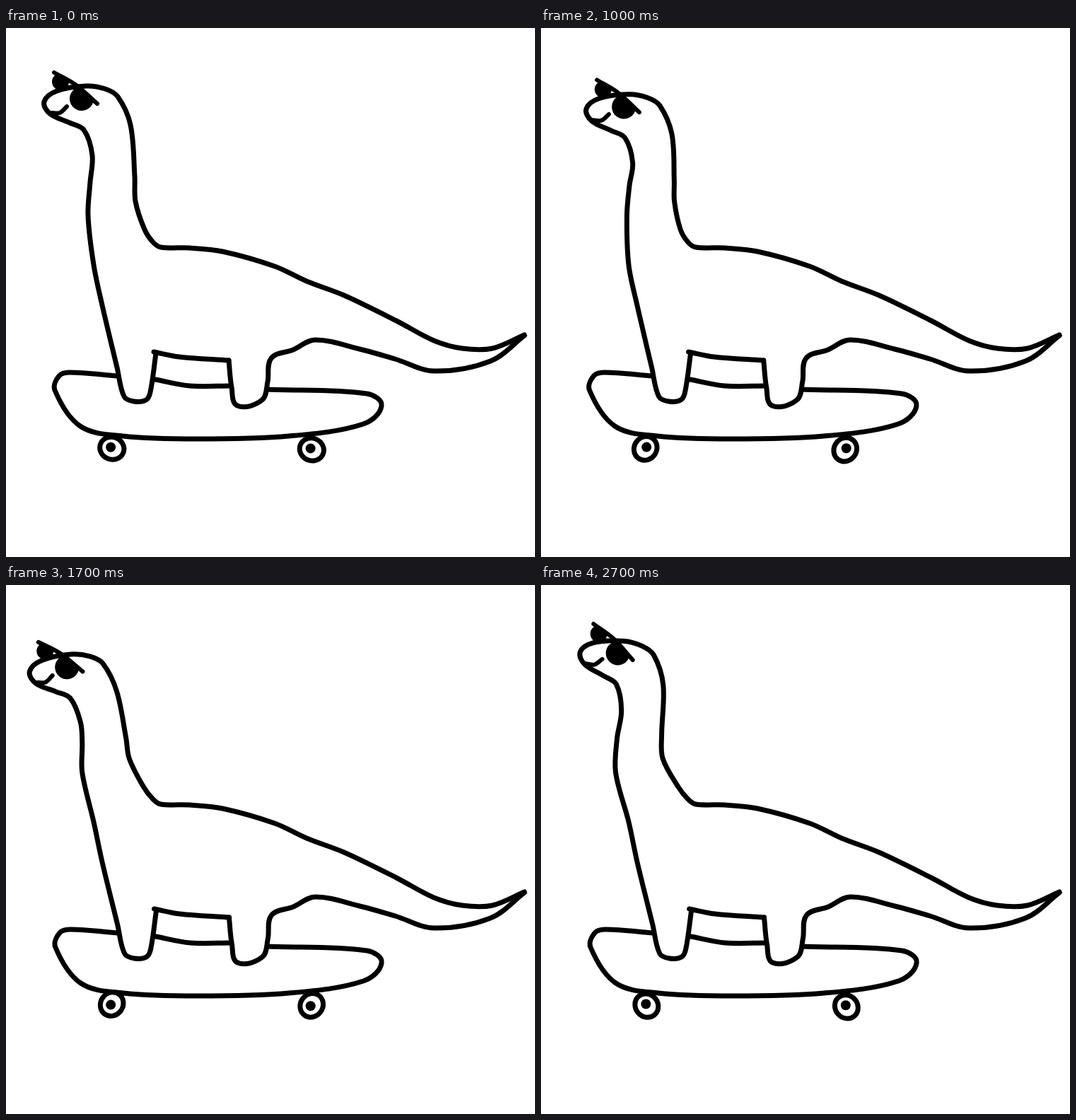
Animation, 748 px wide and 748 px high, one loop 2.8 s. Source, as an HTML page with a canvas:

```html
<!DOCTYPE html>
<html lang="en">
<head>
<meta charset="utf-8">
<title>Skating dinosaur</title>
<style>
  html, body { margin: 0; width: 100%; height: 100%; overflow: hidden; background: #fff; }
  canvas { display: block; width: 748px; height: 748px; }
</style>
</head>
<body>
<canvas id="stage" width="748" height="748"></canvas>
<script>
const ctx = document.getElementById('stage').getContext('2d');
const LOOP = 2800, STEP = 100, PHASE = 8;
const TAU = 2 * Math.PI, DEG = TAU / 360;

// Key points of each stroke in the resting pose, written as "x,y x,y ...".
const pts = text => text.split(' ').map(p => p.split(',').map(Number));
const arcPts = (x, y, r, from, to) => Array.from({ length: 13 }, (_, i) => {
  const a = mix(from, to, i / 12) * DEG;
  return [x + r * Math.cos(a), y + r * Math.sin(a)];
});

const neckFront = pts('212,460 204,515 198,526 181,528 167,521 157,480 136,392 124,335 116,265 119,218 122,180 110,144 90,134 62,121');
const headAndNape = pts('54,104 72,89 113,82 140,86 158,97 176,137 182,210 183,245 196,285 208,303 219,310');
const back = pts('260,311 306,316 380,337 425,358 478,378 552,414 605,442 645,453 688,453 733,434');
const underside = pts('733,435 685,471 605,485 550,468 500,454 437,441 406,455 375,467 370,500 362,526 327,534 319,508 315,470');
const belly = pts('315,470 245,465 209,458');
const board = pts('158,492 90,487 75,492 69,512 105,563 165,577 270,581 400,577 505,560 531,534 510,517 370,511');
const deck = pts('211,497 260,506 318,506');
const smile = pts('64,120 76,120 86,111');
const shades = pts('68,63 98,80 129,107');
const lenses = [arcPts(77, 76, 11, -10, 249), arcPts(107, 100, 16, 6, 256)];
const strokes = [board, deck, [...neckFront, ...headAndNape, ...back], underside, belly];

// The head swings between four poses, each move slowing down more than the last.
const HEAD = { x: 98.5, y: 85 };
const poses = [
  { ...HEAD, tilt: 0, sway: 0 },
  { x: 127, y: 91, tilt: 4.6, sway: 12 },
  { x: 69.5, y: 108, tilt: -5, sway: -8 },
  { x: 102, y: 80.5, tilt: 6.8, sway: -11 }
];
const slowing = [1, 1.3, 2];

function mix(a, b, u) { return a + (b - a) * u; }

function smooth(from, to, v) {
  const u = Math.min(1, Math.max(0, (v - from) / (to - from)));
  return u * u * (3 - 2 * u);
}

function poseAt(step) {
  const i = Math.min(2, Math.floor(step / PHASE));
  const left = Math.max(0, 1 - (step - i * PHASE) / PHASE);
  const u = 1 - left ** slowing[i];
  const between = key => mix(poses[i][key], poses[i + 1][key], u);
  return { x: between('x'), y: between('y'), tilt: between('tilt') * DEG, sway: between('sway') };
}

// Rigid head, bending neck, nearly still body.
function makeWarp(pose) {
  const cos = Math.cos(pose.tilt), sin = Math.sin(pose.tilt);
  return ([x, y]) => {
    const dx = x - HEAD.x, dy = y - HEAD.y;
    const rigid = 1 - smooth(160, 255, y);
    const bend = 1 - smooth(255, 325, y + (x - 118) / 4);
    const settle = 0.1 * smooth(380, 440, y) * Math.max(0, 1 - x / 600);
    return [
      mix(x + pose.sway * (bend - settle), pose.x + dx * cos - dy * sin, rigid),
      mix(y, pose.y + dx * sin + dy * cos, rigid)
    ];
  };
}

// Smooth curve through the points; handles scale with each segment's length.
function trace(points) {
  const at = i => points[Math.min(points.length - 1, Math.max(0, i))];
  const handle = (i, reach) => {
    const [ax, ay] = at(i - 1), [bx, by] = at(i + 1), [x, y] = at(i);
    const k = reach / Math.hypot(bx - ax, by - ay);
    return [x + (bx - ax) * k, y + (by - ay) * k];
  };
  ctx.beginPath();
  ctx.moveTo(...points[0]);
  for (let i = 1; i < points.length; i++) {
    const [a, b] = [at(i - 1), at(i)];
    const reach = Math.hypot(b[0] - a[0], b[1] - a[1]) / 3;
    ctx.bezierCurveTo(...handle(i - 1, reach), ...handle(i, -reach), ...b);
  }
}

// A slightly oval ring and its hub wobble around the axle.
function wheel(x, y, turn) {
  const c = Math.cos(turn), s = -Math.sin(turn);
  ctx.beginPath();
  ctx.ellipse(x + 1.3 * c, y + 1.3 * s, 17.3, 15.8, -turn - 0.2, 0, TAU);
  ctx.stroke();
  ctx.beginPath();
  ctx.arc(x - 0.7 * c, y - 0.4 - 0.7 * s, 7, 0, TAU);
  ctx.fill();
}

function drawSpeedLines() {
  ctx.lineCap = 'butt';
  ctx.lineWidth = 6.5;
  ctx.beginPath();
  for (const row of [-1, 0, 1]) {
    const length = row ? 51 : 38;
    const y = 533 + row * 13;
    ctx.moveTo(554, y);
    ctx.lineTo(554 + length, y + row * 10.5 - (row ? 0 : 2));
  }
  ctx.stroke();
}

function draw(time) {
  const step = Math.floor((time % LOOP) / STEP);
  const warp = makeWarp(poseAt(step));
  const line = points => { trace(points.map(warp)); ctx.stroke(); };

  ctx.fillStyle = '#fff';
  ctx.fillRect(0, 0, 748, 748);
  ctx.fillStyle = ctx.strokeStyle = '#000';
  ctx.lineJoin = ctx.lineCap = 'round';
  ctx.lineWidth = 7;

  const turn = step * STEP / LOOP * 2 * TAU - 0.6;
  wheel(148.7, 593.5, turn);
  wheel(431.2, 595.2, turn);
  strokes.forEach(line);

  ctx.lineWidth = 6;
  [smile, shades].forEach(line);
  ctx.lineWidth = 2;
  for (const lens of lenses) {
    line(lens);
    ctx.fill();
  }

  if (step % 5 > 2) drawSpeedLines();
}

const start = performance.now();
function tick() {
  draw(performance.now() - start);
  requestAnimationFrame(tick);
}
tick();
</script>
</body>
</html>
```
